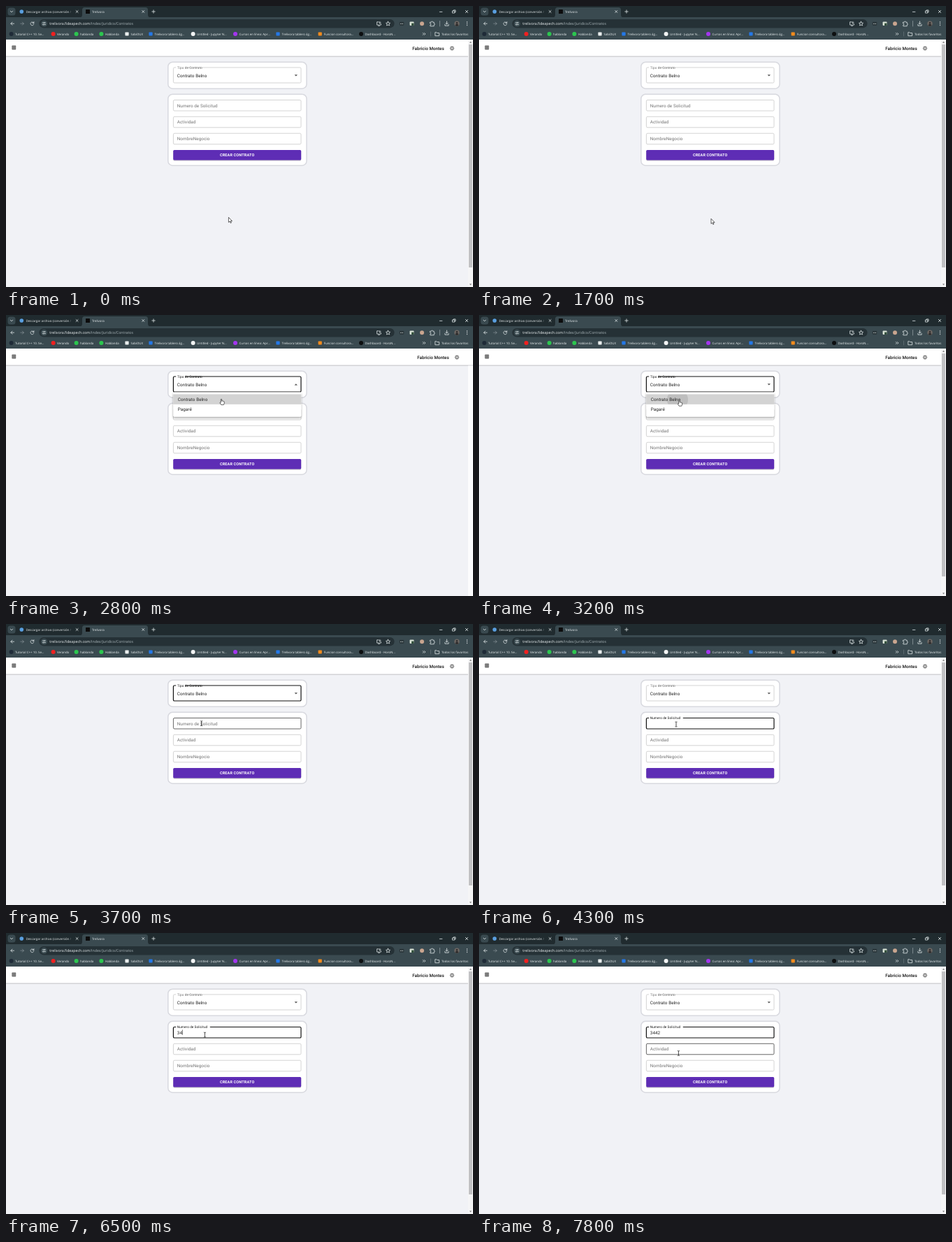
An HTML page for the animation above (8 s loop, 668 by 402 pixels).

```html
<!DOCTYPE html>
<html lang="es">
<head>
<meta charset="utf-8">
<title>Contratos</title>
<style>
html, body { margin: 0; width: 100%; height: 100%; overflow: hidden; background: #f1f2f6; }
svg { display: block; width: 668px; height: 402px; }
text { text-rendering: geometricPrecision; white-space: pre; }
.ui { font-family: "Open Sans", "Noto Sans", sans-serif; font-size: 4.4px; fill: #eef3f4; }
.url { font-size: 5.28px; }
.app { font-family: Roboto, Arial, sans-serif; font-size: 6.3px; letter-spacing: .0094em; fill: #222; }
.hint { fill: #737373; }
.bold { font-weight: 500; letter-spacing: 0; }
.line { fill: none; stroke: #dfe6e8; stroke-width: .8; stroke-linecap: round; stroke-linejoin: round; }
</style>
</head>
<body>
<svg id="stage" viewBox="0 0 668 402" xmlns="http://www.w3.org/2000/svg"></svg>
<script>
const LOOP = 8000, STEP = 100;
const LEFT = 239.4, RIGHT = 422;
const SELECT = { y: 88, h: 22 };
const FIELDS = [
  { y: 134.5, h: 15.5, name: 'Numero de Solicitud' },
  { y: 158.3, h: 15.5, name: 'Actividad' },
  { y: 182.2, h: 15.5, name: 'NombreNegocio' }
];
const OPEN = 2400, PICK = 3100, CLOSE = 3200, FOCUS = 3800;
const KEYS = [6300, 6500, 6900, 7100], NUMBER = '3442';
// Times at which the caret turns on and off
const CARET = [[3800, 4300], [4800, 5400], [5900, 7700]];
// Pointer path: time, x, y
const PATH = [
  [0, 318.4, 302.3], [400, 318.4, 302.3], [500, 318, 301], [600, 317.4, 299.5], [1600, 317.4, 299.5],
  [1700, 332, 304.3], [1800, 343, 299], [1900, 350, 268], [2000, 354, 227], [2100, 354, 177],
  [2200, 352, 128], [2300, 350, 110], [2400, 349.6, 109.6], [2500, 347, 111], [2700, 322, 118],
  [2900, 294, 122], [3100, 286.4, 121.8], [3400, 286.4, 121.8], [3500, 284, 127], [3600, 281, 138],
  [3700, 279.6, 142.2], [4200, 279.6, 142.2], [4300, 282, 143.5], [4500, 284.4, 145.6],
  [7600, 284.4, 145.6], [7700, 285, 160], [7800, 285.4, 172], [8000, 285.4, 172]
];

const rect = (x, y, w, h, fill, r = 0, more = '') =>
  `<rect x="${x}" y="${y}" width="${w}" height="${h}" rx="${r}" fill="${fill}" ${more}/>`;
const dot = (x, y, r, fill, more = '') => `<circle cx="${x}" cy="${y}" r="${r}" fill="${fill}" ${more}/>`;
const line = (d, more = '') => `<path class="line" d="${d}" ${more}/>`;
const text = (x, y, s, cls, more = '') => `<text x="${x}" y="${y}" class="${cls}" ${more}>${s}</text>`;
const cross = (x, y, r) => line(`M${x - r} ${y - r}l${2 * r} ${2 * r}m0 ${-2 * r}l${-2 * r} ${2 * r}`);

function tabs() {
  return rect(0, 0, 668, 20, '#202b2f') +
    rect(2.5, 2.5, 11, 11, '#3a4a50', 3.5) + line('M6.3 7.2l1.7 1.7l1.7-1.7') +
    dot(22.3, 8, 2.8, '#5a9fe0') +
    text(28.7, 9.7, 'Descargar archivo (conversión <tspan opacity=".5">/</tspan>', 'ui') + cross(101.6, 8, 1.5) +
    '<path fill="#3a4a50" d="M105 16.5Q109 16.5 109 12.5V5.5Q109 2 112.5 2H199.5Q203 2 203 5.5V12.5Q203 16.5 207 16.5Z"/>' +
    rect(114, 5, 6, 6, '#0c0c0c', .6) + text(123, 9.7, 'Trelivora', 'ui') + cross(196.3, 8, 1.5) +
    line('M208.8 8h4.4m-2.2-2.2v4.4') +
    line('M620.3 8.4h3.6') + line('M638.8 7h3v3h-3zM640 7v-1.1h3v3h-1.1', 'stroke-width=".6"') + cross(659, 8, 1.7);
}

function toolbar() {
  const puzzle = 'M606.8 23.2h1.6a1.1 1.1 0 0 1 2.2 0h1.6v1.7a1.1 1.1 0 0 1 0 2.2v1.7h-5.4v-1.7a1.1 1.1 0 0 0 0-2.2z';
  return rect(0, 16, 668, 32, '#3a4a50') +
    line('M11.5 25.2H7m2-2.1l-2.1 2.1l2.1 2.1') +
    line('M20.8 25.2h4.5m-2-2.1l2.1 2.1l-2.1 2.1', 'opacity=".4"') +
    line('M39.6 24.2a2.4 2.4 0 1 0 .2 1.8M39.9 22.6v1.8h-1.8') +
    rect(47.5, 19, 508, 12.4, '#253136', 6.2) +
    dot(54.5, 25.2, 4.6, '#3a4a50') +
    line('M52.3 24h2m1.2 0h1M52.3 26.6h.8m1.5 0h2', 'stroke-width=".7"') +
    dot(54.8, 24, .7, 'none', 'stroke="#dfe6e8" stroke-width=".5"') + dot(53.8, 26.6, .7, 'none', 'stroke="#dfe6e8" stroke-width=".5"') +
    text(62.3, 27, 'trelivora.fideapech.com<tspan fill="#aab6ba">/Index/Juridico/Contratos</tspan>', 'ui url') +
    line('M533 22.8h-2.4v4.3h5.8v-1.4M532.4 28.3h2.2M534.8 22.3v2.6m-1.2-1.1l1.2 1.2l1.2-1.2', 'stroke-width=".7"') +
    line('M546.5 22.2l.9 1.9l2.1.3l-1.5 1.5l.4 2.1l-1.9-1l-1.9 1l.4-2.1l-1.5-1.5l2.1-.3z', 'stroke-width=".7"') +
    rect(562.8, 22.8, 6.4, 5, '#2a3539', 1) + [564.4, 566, 567.6].map(x => dot(x, 25.3, .55, '#dfe6e8')).join('') +
    rect(577.5, 22.4, 6, 5.6, '#d9e3d6', 1) + rect(580, 24.6, 3.5, 3.4, '#35523f') +
    dot(595, 25.3, 3, '#c9a58f') + line(puzzle) +
    line('M620.5 21.5v7.5', 'stroke="#5d6d73" opacity=".5"') +
    line('M630.5 22v4m-1.7-1.6l1.7 1.7l1.7-1.7M627.9 26.4v1.8h5.2v-1.8') +
    dot(645, 25.3, 3.7, '#6d6763') + dot(645, 24.3, 1.3, '#2b2a2b') + '<path fill="#2b2a2b" d="M642.6 28q.3-2.3 2.4-2.3t2.4 2.3q-2.4 1.6-4.8 0z"/>' +
    [23, 25.3, 27.6].map(y => dot(659.5, y, .65, '#eef3f4')).join('');
}

function bookmarks() {
  const items = [
    [7.6, '#1f2b38', 'Tutorial C++ 10. Se...'], [67.6, '#f02020', 'Verando'], [100.6, '#2cc64f', 'hablanda'],
    [136.4, '#2cc64f', 'Hablanda'], [173, '#e9eded', 'SabiDUX', 1], [207, '#2478e8', 'Trelivora tablero ág...', 1],
    [267.6, '#f2f4f4', 'Untitled - Jupyter N...'], [328, '#a435f0', 'Cursos en línea: Apr...'],
    [389, '#2478e8', 'Trelivora tablero ág...', 1], [449.2, '#f28b1d', 'Funcion consultora...', 1],
    [508, '#0d0f10', 'Dashboard - HoroN...']
  ];
  return items.map(([x, fill, s, square]) =>
    (square ? rect(x - 2.6, 37.4, 5.2, 5.2, fill, .8) : dot(x, 40, 3, fill)) + text(x + 5.5, 41.6, s, 'ui')).join('') +
    line('M596.3 38.6l1.4 1.4l-1.4 1.4M598.5 38.6l1.4 1.4l-1.4 1.4', 'stroke-width=".6"') +
    line('M607.5 37v6', 'opacity=".25"') +
    line('M613.8 42.3v-4.6h2l.8.9h3v3.7z', 'stroke-width=".6"') + text(623, 41.6, 'Todos los favoritos', 'ui');
}

function header() {
  const teeth = Array.from({ length: 8 }, (_, i) =>
    `<path d="M0-2.1V-3.1" stroke="#444" stroke-width="1" transform="rotate(${i * 45})"/>`).join('');
  return rect(0, 48, 668, 24, '#fff') + rect(0, 71.7, 668, .8, '#b4b4b8') +
    rect(8.4, 56.6, 5.8, 5.8, '#6e6e6e', .6) +
    '<path d="M8.4 58.6h5.8m-5.8 1.9h5.8M10.3 57v5.4m1.9-5.4v5.4" stroke="#999" stroke-width=".35"/>' +
    '<g id="account">' + text(581.2, 62.6, 'Fabricio Montes', 'app bold', 'style="fill:#111"') +
    `<g transform="translate(638 60.5)">${teeth}<circle r="2.2" fill="#fff" stroke="#444" stroke-width=".7"/>` +
    '<circle r=".9" fill="none" stroke="#444" stroke-width=".5"/></g></g>';
}

const scrollbar = () =>
  rect(661, 72.5, 7, 329.5, '#fcfcfd') +
  '<g id="scroll">' + rect(661, 48, 7, 354, '#f5f5f6') + rect(662, 55, 5, 319, '#c1c1c3') +
  '<path fill="#777" d="M662.9 52.7l1.6-2l1.6 2zM662.9 397.4l1.6 2l1.6-2z"/></g>';

const card = (y, h) =>
  rect(231.8, y, 198.2, h, '#fff', 6.5, 'stroke="#d8d9df" stroke-width="1.5"');

function form() {
  return card(80.2, 38) + card(126.2, 102) +
    '<path id="box3"/>' + text(245, 89.6, 'Tipo de Contrato', 'app', 'id="type" style="font-size:4.73px"') +
    text(244.8, 101.7, 'Contrato Belno', 'app') +
    '<path id="arrow" d="M-2.2-1.1h4.4l-2.2 2.2z" fill="#555"/>' +
    FIELDS.map((f, i) => `<path id="box${i}"/>` +
      text(0, 0, f.name, 'app hint', `id="name${i}" transform="translate(244.8 ${f.y + 10})"`)).join('') +
    text(244.8, 144.5, '', 'app', 'id="value"') + rect(0, 138.4, .6, 7.4, '#111', 0, 'id="caret"') +
    rect(239.2, 206.9, 183, 14.6, '#000', 1.6, 'opacity=".22"') +
    rect(239.2, 206, 183, 14.4, '#5e2db5', 1.6, 'id="button"') +
    text(330.7, 214.9, 'CREAR CONTRATO', 'app', 'text-anchor="middle" style="font-size:5.51px;font-weight:600;fill:#fff;letter-spacing:.0286em"');
}

const menu = () =>
  '<g id="menu"><g filter="url(#shade)">' + rect(239.2, 110.4, 183, 35, '#fff', 1.6) + '</g>' +
  rect(239.2, 113.4, 183, 14.4, '#d3d3d3') +
  '<g clip-path="url(#item)"><circle id="ripple" cx="284" cy="121" fill="#000" opacity=".1"/></g>' +
  text(245.8, 122.6, 'Contrato Belno', 'app') + text(245.8, 136.9, 'Pagaré', 'app') + '</g>';

const pointer = () =>
  '<g id="pointer" stroke-linejoin="round">' +
  '<path id="plain" d="M0 0V7.2L1.7 5.7L2.8 8.2L4 7.7L2.9 5.3H5.1Z" fill="#fff" stroke="#111" stroke-width=".65"/>' +
  '<path id="hand" d="M-.7 .6Q0-.5.7.6V3.1Q1.5 2.7 2 3.3Q2.7 2.9 3.2 3.6Q4.2 3.4 4.2 4.4V6.4L3.4 8.4H-.3L-2 5.5Q-1.8 4.4-.7 5.2Z" fill="#fff" stroke="#111" stroke-width=".65"/>' +
  '<path id="beam" d="M-1.5-3.4H-.5L0-3L.5-3.4H1.5M0-3V3M-1.5 3.4H-.5L0 3L.5 3.4H1.5" fill="none" stroke="#111" stroke-width=".75"/></g>';

document.getElementById('stage').innerHTML =
  '<defs><filter id="shade" x="-10%" y="-20%" width="120%" height="160%">' +
  '<feDropShadow dx="0" dy="1.7" stdDeviation="1.6" flood-color="#000" flood-opacity=".38"/></filter>' +
  '<clipPath id="item">' + rect(239.2, 113.4, 183, 14.4, '#000') + '</clipPath></defs>' +
  rect(0, 0, 668, 402, '#f1f2f6') + tabs() + toolbar() + bookmarks() + header() + scrollbar() + form() + menu() + pointer();

const el = id => document.getElementById(id);
const set = (id, attrs) => { for (const k in attrs) el(id).setAttribute(k, attrs[k]); };
const show = (id, on) => set(id, { visibility: on ? 'visible' : 'hidden' });
const clamp = v => Math.max(0, Math.min(1, v));
const ease = v => 1 - (1 - clamp(v)) ** 3;

function pointAt(t) {
  const i = Math.max(1, PATH.findIndex(p => p[0] >= t));
  const [a, b] = [PATH[i - 1], PATH[i]];
  const k = (t - a[0]) / (b[0] - a[0]);
  return [a[1] + (b[1] - a[1]) * k, a[2] + (b[2] - a[2]) * k];
}

// Rounded outline whose top edge leaves a gap for the label
function outline(id, { y, h }, state, gap) {
  const r = 1.6, b = y + h, [g0, g1] = gap || [300, 300];
  const [stroke, width] = { idle: ['#c2c2c2', .7], hover: ['#333', .75], focus: ['#111', 1.2] }[state];
  set(id, {
    d: `M${g1} ${y}H${RIGHT - r}Q${RIGHT} ${y} ${RIGHT} ${y + r}V${b - r}Q${RIGHT} ${b} ${RIGHT - r} ${b}` +
       `H${LEFT + r}Q${LEFT} ${b} ${LEFT} ${b - r}V${y + r}Q${LEFT} ${y} ${LEFT + r} ${y}H${g0}`,
    fill: 'none', stroke, 'stroke-width': width
  });
}

function draw(t) {
  const [x, y] = pointAt(t);
  const locked = t >= OPEN && t < CLOSE, menuOn = t >= OPEN && t < 3400;
  const over = ({ y: top, h }) => !menuOn && x > LEFT && x < RIGHT && y >= top && y <= top + h;
  const onButton = over({ y: 206, h: 14.4 });
  const onItem = menuOn && y > 113.4 && y < 142;

  set('account', { transform: `translate(${locked ? 7 : 0} 0)` });
  show('scroll', !locked);

  const selectFocus = t >= OPEN && t < FOCUS;
  outline('box3', SELECT, selectFocus ? 'focus' : over(SELECT) ? 'hover' : 'idle', [243.2, 256]);
  el('type').style.fill = selectFocus ? '#111' : '#707070';
  set('arrow', { transform: `translate(414.8 99.3) scale(1 ${locked ? -1 : 1})` });

  const rise = ease((t - FOCUS) / 200), focused = t >= FOCUS;
  FIELDS.forEach((f, i) => {
    const mine = focused && i === 0;
    outline('box' + i, f, mine ? 'focus' : over(f) ? 'hover' : 'idle', mine && [243.2, 243.2 + 48.6 * rise]);
  });
  set('name0', { transform: `translate(244.8 ${144.5 - 8.5 * rise}) scale(${1 - .25 * rise})` });
  el('name0').style.fill = focused ? '#111' : '';

  const typed = KEYS.filter(k => t >= k).length;
  el('value').textContent = NUMBER.slice(0, typed);
  set('caret', { x: 244.7 + typed * 3.6 });
  show('caret', CARET.some(([on, off]) => t >= on && t < off));
  set('button', { fill: onButton ? '#4a2395' : '#5e2db5' });

  const grow = ease((t - OPEN) / 300);
  const fade = t > CLOSE ? clamp(1 - (t - CLOSE) / 160) : 1;
  const sx = .75 + .25 * grow;
  set('menu', {
    opacity: menuOn ? grow * fade : 0,
    transform: `translate(330.7 110.4) scale(${sx} ${sx * sx}) translate(-330.7 -110.4)`
  });
  set('ripple', { r: t >= PICK ? 7 + 8 * clamp((t - PICK) / 100) : 0 });

  const beam = FIELDS.some(over), hand = onItem || onButton || over(SELECT);
  set('pointer', { transform: `translate(${x} ${y})` });
  show('beam', beam);
  show('hand', hand);
  show('plain', !beam && !hand);
}

const start = performance.now();
function tick() {
  const t = (performance.now() - start) % LOOP;
  draw(Math.floor(t / STEP) * STEP);
  requestAnimationFrame(tick);
}
tick();
</script>
</body>
</html>
```
